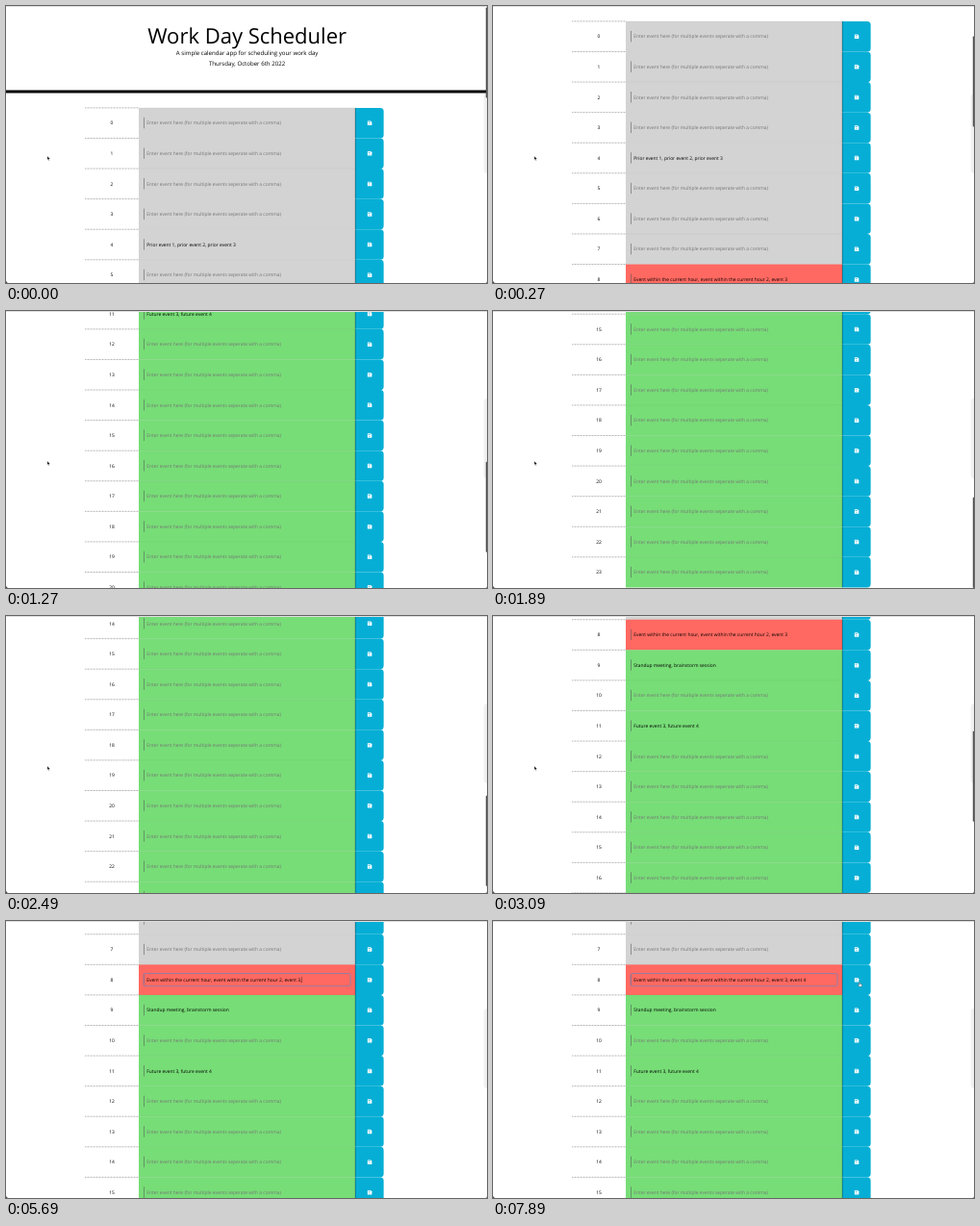
Recreate the animation shown at these times as an HTML page. Size 500 by 288 pixels, loop 8 s.

```html
<!DOCTYPE html>
<html lang="en">
<head>
<meta charset="utf-8">
<title>Work Day Scheduler</title>
<style>
  html, body { margin: 0; width: 100%; height: 100%; overflow: hidden; background: #fff; }
  svg { display: block; width: 500px; height: 288px; }
  text { font-family: "Open Sans", sans-serif; font-size: 4.92px; text-rendering: geometricPrecision; white-space: pre; }
  .mid { text-anchor: middle; }
  .hint { fill: #757575; }
</style>
</head>
<body>
<svg id="stage" viewBox="0 0 500 288"></svg>
<script>
const LOOP = 8000, ROW_H = 31.58, FIRST_TOP = 105.9, CURRENT = 8;
const PLACEHOLDER = "Enter event here (for multiple events seperate with a comma)";
const TYPED = ", event 4";
const EVENTS = {
  4: "Prior event 1, prior event 2, prior event 3",
  8: "Event within the current hour, event within the current hour 2, event 3",
  9: "Standup meeting, brainstorm session",
  11: "Future event 3, future event 4"
};
const stage = document.getElementById("stage");

function add(parent, tag, attrs, text) {
  const el = document.createElementNS("http://www.w3.org/2000/svg", tag);
  for (const key in attrs) el.setAttribute(key, attrs[key]);
  if (text !== undefined) el.textContent = text;
  return parent.appendChild(el);
}
const show = (el, on) => el.setAttribute("visibility", on ? "visible" : "hidden");
const move = (el, x, y) => el.setAttribute("transform", `translate(${x} ${y})`);

const page = add(stage, "g", {});

function buildHeader() {
  const line = (y, size, text) =>
    add(page, "text", { x: 250.6, y, class: "mid", style: `font-size:${size}px` }, text);
  line(38.6, 22, "Work Day Scheduler");
  line(51.2, 6.13, "A simple calendar app for scheduling your work day");
  line(62.2, 6.13, "Thursday, October 6th 2022");
  add(page, "rect", { x: 0, y: 87.5, width: 500, height: 3 });
}

function buildRow(hour) {
  const row = add(page, "g", {});
  move(row, 0, FIRST_TOP + hour * ROW_H);
  const mid = ROW_H / 2;
  const fill = hour < CURRENT ? "#d3d3d3" : hour === CURRENT ? "#ff6961" : "#77dd77";
  add(row, "path", { d: "M82 0H138", stroke: "#000", "stroke-width": 0.3, "stroke-dasharray": "1 .5" });
  add(row, "text", { x: 110, y: mid + 1.7, class: "mid" }, hour);
  add(row, "rect", { x: 138, y: 0, width: 225.2, height: ROW_H + 0.1, fill });
  add(row, "path", { d: "M138 0H363", stroke: "#000", "stroke-width": 0.3, opacity: 0.12 });
  add(row, "path", { d: `M143.5 ${mid - 5.8}v11.4`, stroke: "#555", "stroke-width": 0.55 });
  const value = add(row, "text", { x: 146.3, y: mid + 1.7, class: EVENTS[hour] ? "" : "hint" },
    EVENTS[hour] || PLACEHOLDER);
  add(row, "path", {
    d: `M363 0H389q3.6 0 3.6 3.6V${ROW_H - 3.6}q0 3.6-3.6 3.6H363Z`, fill: "#06aed5"
  });
  add(row, "path", { d: `M363.2 0V${ROW_H}`, stroke: "#000", "stroke-width": 0.35 });
  // floppy icon
  add(row, "path", { d: `M375.8 ${mid - 2.2}h3.3l1.2 1.2v3.3h-4.5z`, fill: "#fff" });
  add(row, "path", { d: `M376.5 ${mid - 1.5}h2.3v1h-2.3z`, fill: "#5cc8e2" });
  add(row, "circle", { cx: 378, cy: mid + 0.9, r: 0.6, fill: "#5cc8e2" });
  return { row, value, mid };
}

buildHeader();
const rows = Array.from({ length: 24 }, (_, hour) => buildRow(hour));
const active = rows[CURRENT];
const ring = add(active.row, "rect", {
  x: 143.2, y: active.mid - 6.6, width: 214.8, height: 13.2, rx: 1.4,
  fill: "none", stroke: "#8a80ad", "stroke-width": 0.9
});
const caret = add(active.row, "rect", { y: active.mid - 3, width: 0.35, height: 6 });

// window chrome
add(stage, "rect", { width: 500, height: 1, fill: "#dedede" });
add(stage, "path", { d: "M0 285.5Q.2 288 2.5 288H0Z", fill: "#222" });
add(stage, "path", { d: "M500 286.5Q499.8 288 498.5 288H500Z", fill: "#222" });
add(stage, "rect", { x: 496.6, y: 91, width: 10, height: 83, rx: 4, fill: "#f0f0f0" });
const thumb = add(stage, "rect", { x: 498.8, width: 2, height: 94, rx: 0.8, fill: "#555" });

const arrow = add(stage, "path", {
  d: "M0 0V4.1L1 3.2 1.7 4.7 2.4 4.4 1.7 2.9H3Z", stroke: "#fff", "stroke-width": 0.4
});
const beam = add(stage, "path", {
  d: "M-1.2-3Q0-3 0-2.2 0-3 1.2-3M0-2.2V2.4M-1.2 3.2Q0 3.2 0 2.4 0 3.2 1.2 3.2",
  fill: "none", stroke: "#555", "stroke-width": 0.7
});
const hand = add(stage, "path", {
  d: "M-.4-2.2Q.3-2.8.6-2V-.5L2.3 0Q2.8.2 2.6 1L2.1 2.2H-.3L-1.7.5Q-1.4-.2-.4.5Z",
  fill: "#fff", stroke: "#222", "stroke-width": 0.35
});

const SCROLL = [[0, 0], [90, 12], [290, 90], [690, 278], [1090, 402], [1490, 530],
  [1890, 576.4], [2290, 576.4], [2490, 556], [2890, 424], [3090, 354.8], [3290, 322], [3490, 313.2]];
const POINTER_X = [[3690, 42.9], [3890, 72], [4290, 262], [4490, 305], [4890, 353],
  [7290, 351], [7490, 360], [7690, 376], [7890, 381]];
const POINTER_Y = [[3690, 156.1], [3890, 150], [4290, 82], [4490, 60], [7290, 60], [7690, 65], [7890, 66]];

function along(points, t) {
  const i = points.findIndex(p => p[0] >= t);
  if (i < 0) return points[points.length - 1][1];
  if (i === 0) return points[0][1];
  const [t0, a] = points[i - 1], [t1, b] = points[i];
  return a + (b - a) * (t - t0) / (t1 - t0);
}

function held(t) {
  if (t < 100) return 0;
  return Math.floor((t + (t < 1400 ? 130 : 110)) / 200) * 200 - 110;
}

function typedCount(t) {
  if (t < 5490) return 0;
  if (t < 6090) return 1;
  return 1 + Math.round(8 * Math.min(6, (t - 5890) / 200) / 6);
}

function draw(time) {
  const t = held(time);
  const scroll = along(SCROLL, t);
  move(page, 0, -scroll);
  thumb.setAttribute("y", 1.5 + scroll / 3);
  show(thumb, t < 3890);
  thumb.setAttribute("opacity", t < 3690 ? 1 : 0.5);

  active.value.textContent = EVENTS[CURRENT] + TYPED.slice(0, typedCount(t));
  show(ring, t >= 5090);
  show(caret, t >= 5090 && t < 7290);
  caret.setAttribute("x", 146.5 + active.value.getComputedTextLength());

  const x = along(POINTER_X, t), y = along(POINTER_Y, t);
  const visible = t < 5490 || t >= 7290;
  const overInput = x > 143 && x < 358 && Math.abs(y - 61) < 7;
  const overButton = x > 363;
  show(arrow, visible && !overInput && !overButton);
  show(beam, visible && overInput);
  show(hand, visible && overButton);
  for (const pointer of [arrow, beam, hand]) move(pointer, x, y);
}

const start = performance.now();
function tick(now) {
  draw(Math.max(0, now - start) % LOOP);
  requestAnimationFrame(tick);
}
draw(0);
requestAnimationFrame(tick);
</script>
</body>
</html>
```
